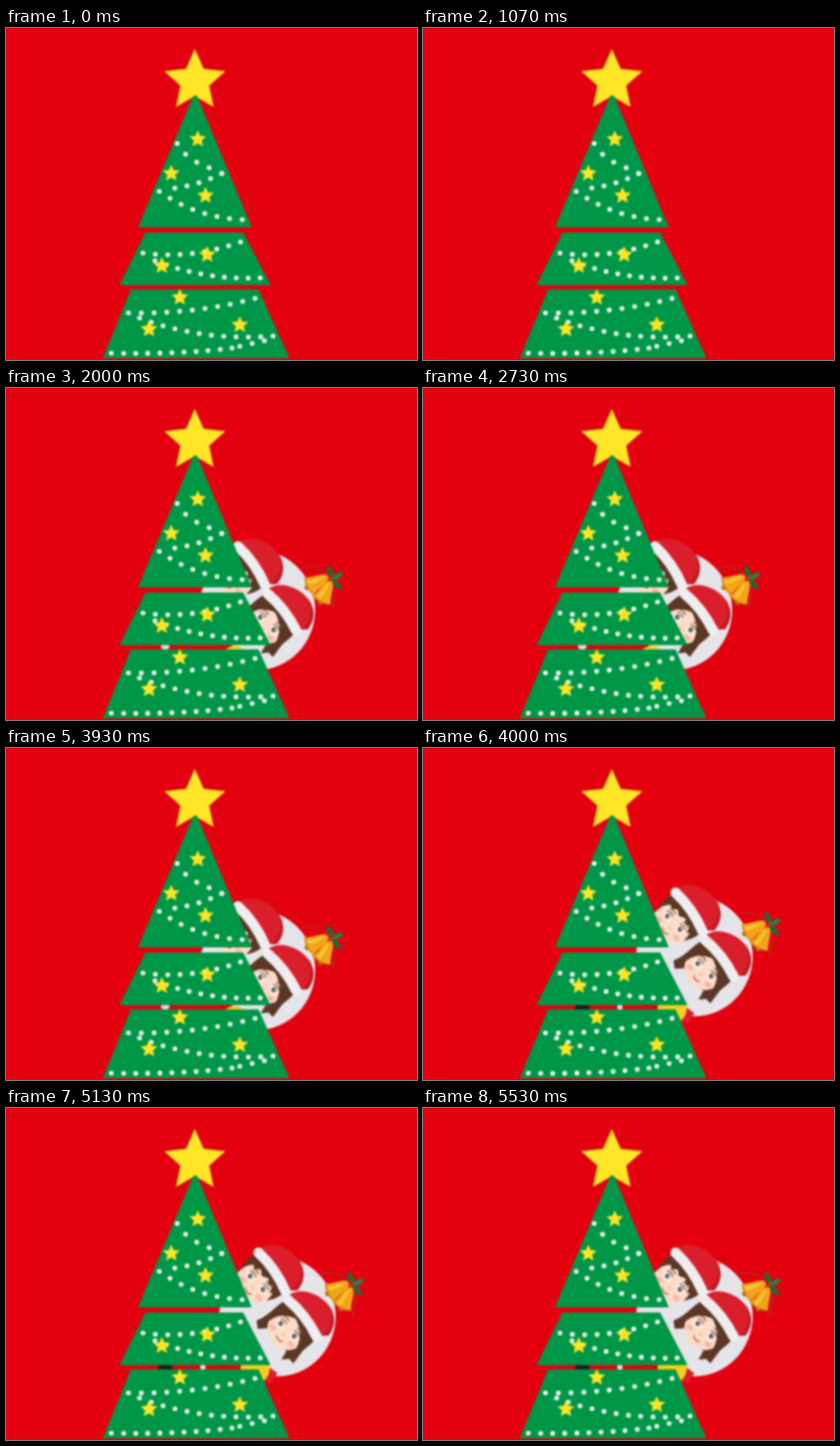
An HTML page for the animation above (5.99 s loop, 480 by 388 pixels).

```html
<!DOCTYPE html>
<html lang="en">
<head>
<meta charset="utf-8">
<title>Christmas tree</title>
<style>
html, body { margin: 0; width: 100%; height: 100%; overflow: hidden; background: #e3000f; }
svg { display: block; width: 100%; height: 100%; }
</style>
</head>
<body>
<svg id="stage" viewBox="0 0 480 388"></svg>
<script>
const LOOP = 5990, PEEK = 2000, LEAN = 4000;

function star(x, y, r) {
  const pts = [];
  for (let i = 0; i < 10; i++) {
    const a = i * Math.PI / 5, d = i % 2 ? r * 0.47 : r;
    pts.push((x + d * Math.sin(a)).toFixed(1) + ',' + (y - d * Math.cos(a)).toFixed(1));
  }
  return `<polygon points="${pts.join(' ')}" fill="#fee525"/>`;
}

// A row of n evenly spaced lights along a curve
const lights = (d, n) => `<path d="${d}" pathLength="${n - 0.99}" stroke-dasharray="0 1"/>`;

const shape = (d, fill) => `<path d="${d}" fill="${fill}"/>`;
const line = (d, color, width) =>
  `<path d="${d}" stroke="${color}" stroke-width="${width}" stroke-linecap="round" fill="none"/>`;
const oval = (x, y, rx, ry, fill, turn = 0) =>
  `<ellipse cx="${x}" cy="${y}" rx="${rx}" ry="${ry}" fill="${fill}" transform="rotate(${turn} ${x} ${y})"/>`;

function eye(x, y) {
  return oval(x, y, 4.8, 4.8, '#fff') + oval(x, y, 2.9, 3.2, '#665349') +
    oval(x + 0.8, y - 0.8, 0.9, 0.9, '#fff') +
    line(`M${x - 4.5},${y - 4}q4.5,-3 9,0`, '#5a3b2e', 1.1) +
    line(`M${x - 4},${y - 8.5}q4,-2 8,0`, '#7a4c33', 1.3);
}

function kid(x, y, turn, longHair) {
  const hair = '#5b3825';
  const back = longHair
    ? 'M-26,-22C-30,-8 -27,8 -33,20L-25,26L-18,18L17,20L20,31L26,24L33,24L30,6C31,-6 31,-12 30,-20Z'
    : 'M-26,-22C-28,-12 -27,-2 -24,4L24,6C29,-2 30,-10 30,-18Z';
  const fringe = longHair
    ? 'M-26,-22C-27,-8 -25,4 -22,10C-21,-4 -12,-10 -3,-14C8,-11 19,-4 23,10C28,-2 30,-10 30,-18Z'
    : 'M-26,-22L-23,-3L-19,-10L-14,-7L-8,-12L-2,-8L5,-12L11,-7L15,-10L19,-2L22,-5L24,5L30,-18Z';
  return `<g transform="translate(${x} ${y}) rotate(${turn})">` +
    shape(back, hair) +
    oval(0, 4, 23.5, 20.5, '#fbdcc8') +
    shape(fringe, hair) +
    eye(-10.5, 2) + eye(11, 1) +
    oval(-14, 12, 4.5, 3, '#f8b9a6') + oval(15, 11, 4.5, 3, '#f8b9a6') +
    oval(1, 9, 1.3, 1, '#e0a58c') +
    line('M-4,15.5q5,4 10,0', '#c9574b', 1.4) +
    shape('M-28,-24C-29,-42 -8,-53 8,-53C24,-53 36,-43 38,-28L30,-19Z', '#da1f2c') +
    shape('M12,-53C27,-51 36,-42 38,-28L33,-23C34,-38 26,-48 12,-53Z', '#c21824') +
    line('M-25,-23Q2,-26 30,-17', '#eeedf0', 12) +
    '</g>';
}

function bell(x, y, turn) {
  return `<g transform="translate(${x} ${y}) rotate(${turn}) scale(0.88)">` +
    oval(0, 14, 3.5, 4, '#b96d12') +
    shape('M0,-17C8,-16 7,1 13,11Q0,17 -13,11C-7,1 -8,-16 0,-17Z', '#f3a51a') +
    shape('M-2,-14C-5,-8 -4,2 -8,10L-3,11C-1,2 0,-8 -2,-14Z', '#fcc93a') +
    line('M-13,11Q0,17 13,11', '#c87912', 1.6) + '</g>';
}

const badge =
  oval(317, 243.5, 68, 70, '#e5e4e9') +
  shape('M200,279L284,279L310,318L240,330L190,310Z', '#e3000f') +
  oval(210, 286, 5, 4, '#e7d9dc') + oval(230, 303, 3, 4, '#efe6e6') +
  oval(186, 305, 9, 7, '#211a1c') +
  shape('M305,301L317,310L309,322L300,318Z', '#d71f2b') +
  oval(291, 304, 17, 18.5, '#f5cf1e') +
  kid(294, 203, 49, false) +
  kid(330, 258, 46, true) +
  line('M370,193Q384,190 400,201M409,218L405,244', '#a8341c', 1.4) +
  bell(387, 211, 62) + bell(397, 223, 26) +
  oval(403, 199, 3, 8, '#1c6b35', -24) +
  oval(411, 204, 3, 7.5, '#258044', 60) +
  oval(410, 213, 3, 8, '#1c6b35', -42) +
  oval(404, 207, 2.6, 2.6, '#cf2a22');

const tiers = [
  'M218.5,80Q221,77 223.5,80L287,233H154Z',
  'M163,239H277L309,300.5H132.5Z',
  'M146,305.5H295L331,386H113Z'
];
const garlands = [
  ['M200,135L210,148L223,157L252,170', 5],
  ['M252,170Q225.5,183.5 197,187', 5],
  ['M179,191Q222.5,221.5 276,224', 8],
  ['M160,263Q217,270.5 274,250', 9],
  ['M174,272Q232.5,295 297,292', 10],
  ['M143,333Q221,334.5 291,316', 11],
  ['M156,339Q230,366.5 312,360', 12],
  ['M123,380Q205,381.5 264,374', 11],
  ['M273,372L302,365.5', 3]
];
const baubles = [[224, 130], [193, 170], [233, 196], [235, 265],
  [182, 278], [203, 315], [167, 352], [273, 347]];

document.getElementById('stage').innerHTML =
  '<defs><filter id="soft" filterUnits="userSpaceOnUse" x="0" y="0" width="480" height="388" ' +
  'color-interpolation-filters="sRGB"><feGaussianBlur stdDeviation="0.9"/></filter></defs>' +
  '<rect width="480" height="388" fill="#e3000f"/>' +
  `<g filter="url(#soft)"><g id="badge">${badge}</g>` +
  star(220.5, 62, 37.5) +
  tiers.map(d => shape(d, '#009647')).join('') +
  '<g fill="none" stroke="#f1faf2" stroke-width="5.6" stroke-linecap="round">' +
  garlands.map(g => lights(...g)).join('') + '</g>' +
  baubles.map(([x, y]) => star(x, y, 10.3)).join('') + '</g>';

const group = document.getElementById('badge');

function draw(t) {
  group.setAttribute('display', t < PEEK ? 'none' : 'inline');
  group.setAttribute('transform', t < LEAN ? 'translate(-24 16)' : 'translate(0 0)');
}

const start = performance.now();
function tick() {
  draw((performance.now() - start) % LOOP);
  requestAnimationFrame(tick);
}
draw(0);
requestAnimationFrame(tick);
</script>
</body>
</html>
```
